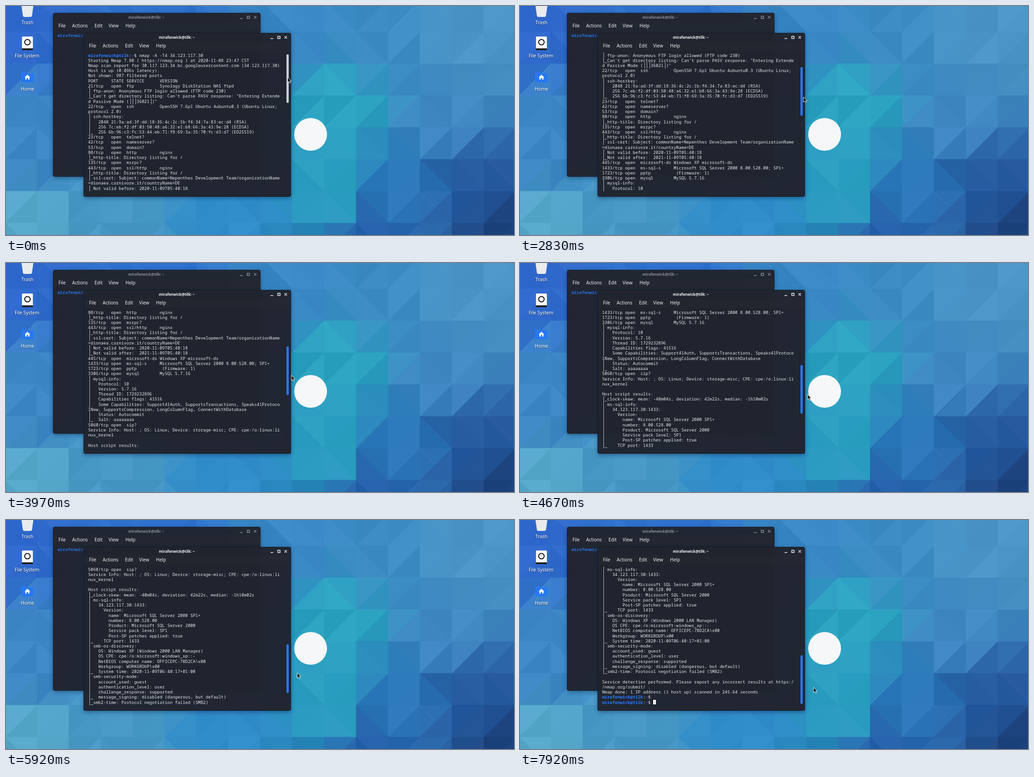
An HTML page with a canvas that plays this animation: 1114x503 px, repeating every 8 s.

```html
<!DOCTYPE html>
<html lang="en">
<head>
<meta charset="utf-8">
<title>Port scan</title>
<style>
html, body { margin: 0; width: 100%; height: 100%; overflow: hidden; background: #3a86c2; }
canvas, svg, pre, #bar { position: absolute; left: 0; top: 0; }
text { font-family: "Noto Sans", sans-serif; }
.label { font-size: 10.3px; fill: #fff; text-anchor: middle; filter: drop-shadow(0 1px 1px #0008); }
.menu { font-size: 10px; font-weight: 500; fill: #eceef0; }
.title { font-size: 7.9px; font-weight: 600; fill: currentColor; text-anchor: middle; }
.window { filter: drop-shadow(0 3px 5px rgba(5, 30, 80, .45)); }
.mono, pre { font-family: "Noto Sans Mono", monospace; font-size: 9.35px; font-variant-ligatures: none; }
pre { left: 180px; top: 102.5px; margin: 0; line-height: 11.23px; color: #e4e6e9; }
pre b { color: #2b7cff; }
pre i { color: transparent; background: linear-gradient(#b4c0cc, #b4c0cc) 3px 0 / 1px 100% no-repeat; }
pre u { display: inline-block; width: 5.6px; height: 10px; background: #fff; vertical-align: top; }
#bar { left: 615px; top: 106px; width: 5px; height: 107px; border-radius: 2.5px; }
</style>
</head>
<body>
<canvas id="wallpaper" width="1114" height="503"></canvas>
<svg width="1114" height="503">
  <defs>
    <g id="frame">
      <rect x=".5" y=".5" width="454" height="359" rx="3" fill="#22252e" fill-opacity=".96" stroke="#171a20"/>
      <path d="M1 19h453v20H1z" fill="#292d36" fill-opacity=".35"/>
      <path d="M443.5 40v318" stroke="#191b22" stroke-opacity=".5"/>
      <text class="title" x="204.5" y="13">mirafenwick@tilk: ~</text>
      <path d="M410 12.5h6M426 7.5h5v5h-5zM441 7.5l5 5m0-5l-5 5" fill="none" stroke="currentColor" stroke-width="1.5"/>
      <g class="menu">
        <text x="12" y="32">File</text><text x="42" y="32">Actions</text><text x="91" y="32">Edit</text>
        <text x="122" y="32">View</text><text x="159" y="32">Help</text>
      </g>
    </g>
  </defs>

  <path d="M908 408l33 33" stroke="#6d9ac4" stroke-opacity=".6" stroke-width=".7"/>
  <circle cx="668" cy="282" r="36" fill="#f5f7f8"/>

  <!-- Desktop icons -->
  <path d="M34 0h26l-3 21q0 3-4 3H41q-4 0-4-3z" fill="#e9ebed"/>
  <rect x="35" y="67" width="24" height="29" rx="2" fill="#f8f8f8"/>
  <path d="M35 93h24v3q0 1-2 1H37q-2 0-2-1z" fill="#202020"/>
  <circle cx="47" cy="79.5" r="6" fill="none" stroke="#111" stroke-width="2"/>
  <path d="M33 145h10l3 3h15v17q0 3-3 3H36q-3 0-3-3z" fill="#2878ef"/>
  <path d="M47 151l6 5.500h-1.500v5h-3v-3.500h-3v3.500h-3v-5H41z" fill="#fff"/>
  <text class="label" x="47" y="40">Trash</text>
  <text class="label" x="46" y="113">File System</text>
  <text class="label" x="47" y="186">Home</text>

  <g class="window" color="#8b8e94">
    <use href="#frame" x="103" y="15"/>
    <text class="mono" style="font-family:'Noto Sans Mono',monospace" x="113" y="67.500" fill="#2a6fe0" font-weight="700">mirafenwick@tilk:~$</text>
    <path d="M225.500 59.500h5v9h-5z" fill="none" stroke="#ccc"/>
  </g>
  <g class="window" color="#f2f3f4"><use href="#frame" x="170" y="59"/></g>
</svg>
<pre id="screen"></pre>
<div id="bar"></div>
<svg id="pointer" width="14" height="18"><path d="M.7.700v11.300l2.600-2.400 1.900 4 1.900-.9-1.900-3.800h3.500z" fill="#111" stroke="#fff" stroke-width=".9"/></svg>

<script>
const lines = String.raw`mirafenwick@tilk:~$ nmap -A -T4 34.123.117.30
Starting Nmap 7.80 ( https://nmap.org ) at 2020-11-08 23:47 CST
Nmap scan report for 30.117.123.34.bc.googleusercontent.com (34.123.117.30)
Host is up (0.096s latency).
Not shown: 987 filtered ports
PORT     STATE SERVICE      VERSION
21/tcp   open  ftp          Synology DiskStation NAS ftpd
| ftp-anon: Anonymous FTP login allowed (FTP code 230)
|_Can't get directory listing: Can't parse PASV response: "Entering Extende
d Passive Mode (|||36021|)"
22/tcp   open  ssh          OpenSSH 7.6p1 Ubuntu 4ubuntu0.3 (Ubuntu Linux; 
protocol 2.0)
| ssh-hostkey: 
|   2048 21:9a:ad:3f:dd:18:36:4c:2c:1b:f4:34:7a:83:ec:d4 (RSA)
|   256 7c:eb:f2:df:03:50:48:a6:32:e1:b8:66:3a:43:9e:28 (ECDSA)
|_  256 6b:96:c3:fc:53:44:eb:71:f8:69:3a:35:70:fc:d3:d7 (ED25519)
23/tcp   open  telnet?
42/tcp   open  nameserver?
53/tcp   open  domain?
80/tcp   open  http         nginx
|_http-title: Directory listing for /
135/tcp  open  msrpc?
443/tcp  open  ssl/http     nginx
|_http-title: Directory listing for /
| ssl-cert: Subject: commonName=Nepenthes Development Team/organizationName
=dionaea.carnivore.it/countryName=DE
| Not valid before: 2020-11-09T05:40:18
|_Not valid after:  2021-11-09T05:40:18
445/tcp  open  microsoft-ds Windows XP microsoft-ds
1433/tcp open  ms-sql-s     Microsoft SQL Server 2000 8.00.528.00; SP1+
1723/tcp open  pptp          (Firmware: 1)
3306/tcp open  mysql        MySQL 5.7.16
| mysql-info: 
|   Protocol: 10
|   Version: 5.7.16
|   Thread ID: 1729232896
|   Capabilities flags: 41516
|   Some Capabilities: Support41Auth, SupportsTransactions, Speaks41Protoco
lNew, SupportsCompression, LongColumnFlag, ConnectWithDatabase
|   Status: Autocommit
|_  Salt: aaaaaaaa
5060/tcp open  sip?
Service Info: Host: ; OS: Linux; Device: storage-misc; CPE: cpe:/o:linux:li
nux_kernel

Host script results:
|_clock-skew: mean: -40m04s, deviation: 42m22s, median: -1h10m02s
| ms-sql-info: 
|   34.123.117.30:1433: 
|     Version: 
|       name: Microsoft SQL Server 2000 SP1+
|       number: 8.00.528.00
|       Product: Microsoft SQL Server 2000
|       Service pack level: SP1
|       Post-SP patches applied: true
|_    TCP port: 1433
| smb-os-discovery: 
|   OS: Windows XP (Windows 2000 LAN Manager)
|   OS CPE: cpe:/o:microsoft:windows_xp::-
|   NetBIOS computer name: OFFICEPC-7BD2CA\x00
|   Workgroup: WORKGROUP\x00
|_  System time: 2020-11-09T06:40:17+01:00
| smb-security-mode: 
|   account_used: guest
|   authentication_level: user
|   challenge_response: supported
|_  message_signing: disabled (dangerous, but default)
|_smb2-time: Protocol negotiation failed (SMB2)

Service detection performed. Please report any incorrect results at https:/
/nmap.org/submit/ .
Nmap done: 1 IP address (1 host up) scanned in 245.64 seconds
mirafenwick@tilk:~$ 
mirafenwick@tilk:~$ <u></u>`.split("\n").map(line =>
  line.replace(/^(mira\w+@\w+):~/, "<b>$1</b>:<b>~</b>").replace(/\|/g, "<i>|</i>"));

const [wallpaper, screenEl, bar, pointer] =
  ["wallpaper", "screen", "bar", "pointer"].map(id => document.getElementById(id));

// Wallpaper: triangles on a square grid, coloured by blending a few key hues
const hues = [
  [0, 30, "2f68cc"], [330, 5, "2f73cf"], [40, 300, "3b85c4"], [30, 490, "56a8ca"],
  [250, 470, "4798c5"], [500, 460, "2f8bc8"], [640, 40, "3a88c6"], [740, 220, "2aa4c0"],
  [720, 400, "2a9fc0"], [820, 80, "3e8cc4"], [1040, 70, "4a95c5"], [960, 230, "3f88c2"],
  [860, 390, "2c78bb"], [1020, 400, "265a9f"], [800, 500, "2762ac"], [1090, 500, "1f457f"]
].map(([x, y, hex]) => [x, y, hex.match(/../g).map(c => parseInt(c, 16))]);

let seed = 11;
const random = () => (seed = seed * 16807 % 2147483647) / 2147483647;

function hueAt(x, y, shift) {
  let total = 0;
  const sum = [0, 0, 0];
  for (const [hx, hy, rgb] of hues) {
    const weight = 1 / (Math.hypot(x - hx, y - hy) + 5) ** 4;
    total += weight;
    rgb.forEach((c, i) => sum[i] += c * weight);
  }
  return `rgb(${sum.map(c => Math.round(c / total + shift))})`;
}

function paintWallpaper() {
  const ctx = wallpaper.getContext("2d"), size = 70;
  for (let y = -13; y < 503; y += size) {
    for (let x = -2; x < 1114; x += size) {
      const falling = random() < .4;
      const [a, b, c, d] = [[x, y], [x + size, y], [x + size, y + size], [x, y + size]];
      for (const corners of falling ? [[a, b, c], [a, c, d]] : [[a, b, d], [b, c, d]]) {
        const [cx, cy] = [0, 1].map(i => corners.reduce((s, p) => s + p[i], 0) / 3);
        ctx.fillStyle = ctx.strokeStyle = hueAt(cx, cy, (random() - .5) * 12);
        ctx.beginPath();
        corners.forEach(p => ctx.lineTo(...p));
        ctx.closePath();
        ctx.fill();
        ctx.stroke();
      }
    }
  }
}

// Each hand movement: start, end, number of visible steps, final x and y
const moves = [
  [440, 860, 4, 605, 166], [1550, 1820, 3, 614, 167], [2400, 2960, 5, 621, 200],
  [3390, 3970, 5, 625, 246], [4400, 5250, 7, 633, 308], [5660, 6620, 8, 642, 352],
  [6750, 6900, 2, 643, 354], [7490, 7920, 4, 643, 367]
];
const PRESS = 2100, LOOP = 8000, VISIBLE = 27, BAR_STEP = 4.064;
const lastRow = lines.length - VISIBLE;
let shownRow = -1;

function pointerAt(t) {
  let x = 617, y = 156;
  for (const [start, end, steps, endX, endY] of moves) {
    if (t < start) break;
    const step = Math.floor((t - start) / (end - start) * (steps - 1) + 1.15);
    const eased = 1 - (1 - Math.min(1, step / steps)) ** 2;
    x += (endX - x) * eased;
    y += (endY - y) * eased;
  }
  return [Math.round(x), Math.round(y)];
}

function draw(now) {
  const t = now % LOOP, dragging = t >= PRESS;
  const [x, y] = pointerAt(t);
  const row = dragging ? Math.max(0, Math.min(lastRow, Math.round((y - 169) / BAR_STEP))) : 0;
  if (row !== shownRow) {
    screenEl.innerHTML = lines.slice(row, row + VISIBLE).join("\n");
    shownRow = row;
  }
  bar.style.background = dragging ? "#2777ff" : x >= 614 ? "#c9cccf" : "#9a9da3";
  bar.style.transform = `translateY(${Math.round(row * BAR_STEP)}px)`;
  pointer.style.transform = `translate(${x}px, ${y}px)`;
  requestAnimationFrame(draw);
}
paintWallpaper();
requestAnimationFrame(draw);
</script>
</body>
</html>
```
